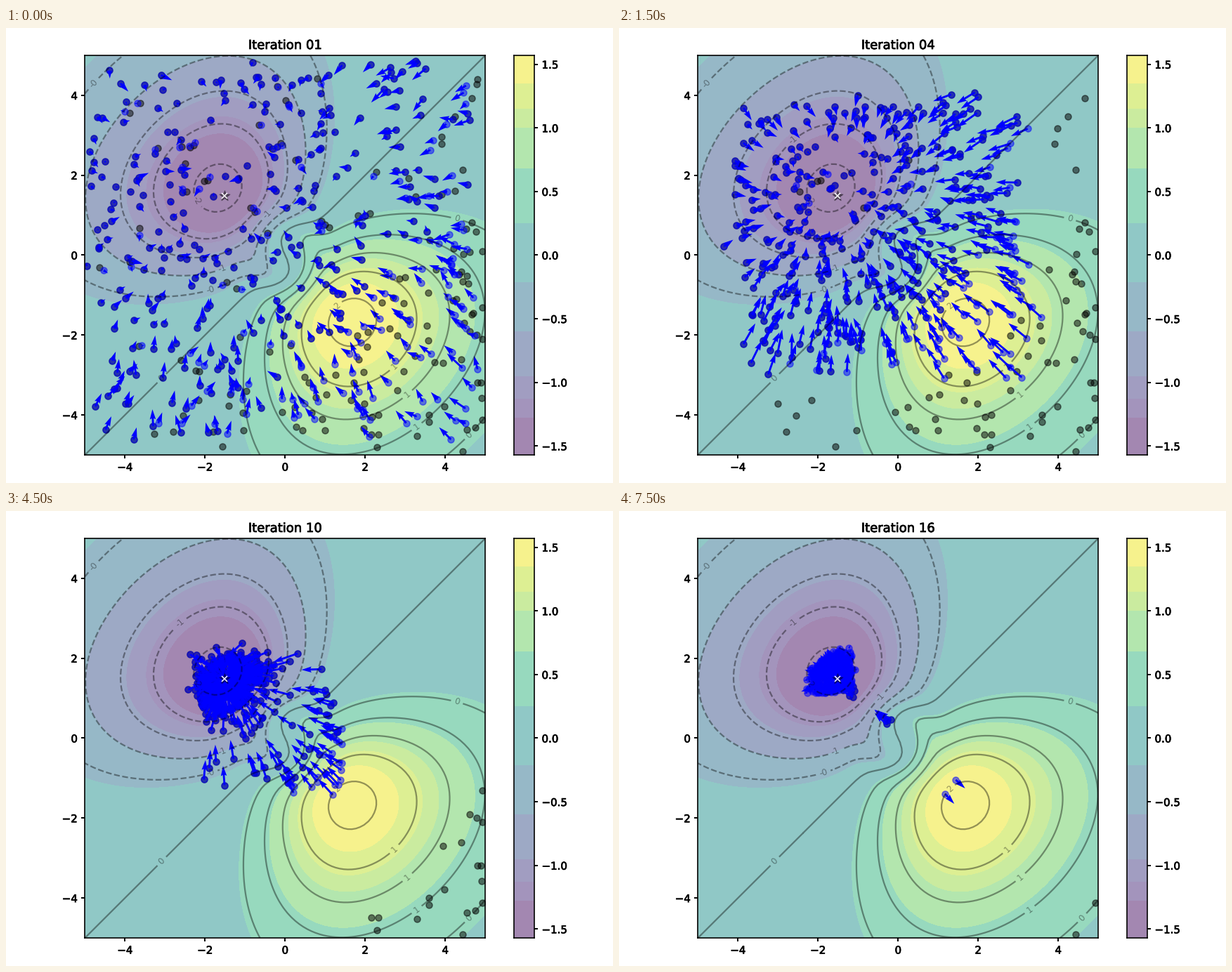
A matplotlib script for the animation above (8 s loop, 864 by 648 pixels).

```python
import numpy as np
import matplotlib.pyplot as plt
from matplotlib import patheffects
from matplotlib.animation import FuncAnimation

W, H, DPI = 864, 648, 108
STEPS = 16
COUNT = 400
GOAL = np.array([-1.51, 1.49])
INERTIA = 0.8


def height(x, y):
    """A hill and a valley facing each other, twisted around the centre."""
    r = np.hypot(x, y) + 1e-9
    twist = np.radians(68) * np.exp(-(r / .79) ** 2.85)
    a = np.arctan2(y, x) + np.pi / 4 - twist
    u, v = r * np.cos(a), r * np.sin(a)
    fall = (np.abs(u) - 2.1) ** 2 / 11.2 + v**2 / 22 + .015 * v**4 / (u**2 + .4)
    return 1.6 * np.exp(-fall) * np.cos(a) * (1 - np.exp(-r**1.8))


def social_pull(k):
    """Pull towards the swarm's best: a kick, then a slow rise."""
    return .05 if k < 2 else min(.019 + .032 * (k / 8) ** 2, .06)


def own_pull(k):
    """Pull towards a particle's own best: comes and goes in waves."""
    return .022 + .075 * max(0, np.cos(2 * np.pi * (k - 4.5) / 8.5))


def simulate():
    rng = np.random.RandomState(100)
    pos = (rng.rand(2, COUNT) * 10 - 5).T
    vel = rng.randn(2, COUNT).T * .1
    best = pos.copy()
    states = []
    for k in range(STEPS):
        vel = (INERTIA * vel + social_pull(k) * (GOAL - pos)
               + own_pull(k) * (best - pos))
        pos = pos + vel
        better = height(*pos.T) < height(*best.T)
        best = np.where(better[:, None], pos, best)
        states.append((best, pos, vel))
    return states


def place(left, top, right, bottom):
    return fig.add_axes([left / W, 1 - bottom / H, (right - left) / W, (bottom - top) / H])


def embolden(texts):
    for t in texts:
        t.set_path_effects([patheffects.withStroke(linewidth=.5, foreground="black")])


def style(axes):
    for side in axes.spines.values():
        side.set_linewidth(1.1)
    axes.tick_params(width=1.3)
    embolden(axes.get_xticklabels() + axes.get_yticklabels())


plt.rcParams["font.family"] = "DejaVu Sans"
fig = plt.figure(figsize=(W / DPI, H / DPI), dpi=DPI, facecolor="white")
ax = place(112.4, 39, 682.2, 608)
cax = place(723, 39, 752, 608)

# tinted bands of the landscape
edges = np.array([-1.6, -1.28, -1.13, -.95, -.6, -.21, .25, .68, 1, 1.15, 1.35, 1.6])
mids = (edges[:-1] + edges[1:]) / 2
tints = .5 + .5 * plt.get_cmap("viridis")((mids + 1.57) / 3.14)[:, :3]

grid = np.linspace(-5, 5, 100)
gx, gy = np.meshgrid(grid, grid)
gz = height(gx, gy)
ax.set(xlim=(-5, 5), ylim=(-5, 5))
ax.contourf(gx, gy, gz, edges, colors=tints, zorder=0)
lines = ax.contour(gx, gy, gz, np.arange(-5, 6) * .3, colors="black", alpha=.4)
ax.clabel(lines, inline=True, fontsize=8, fmt="%.0f")
ax.set_xticks(range(-4, 5, 2))
ax.set_yticks(range(-4, 5, 2))
style(ax)

for low, high, tint in zip(edges[:-1], edges[1:], tints):
    cax.axhspan(low, high, color=tint, lw=0)
cax.set(xlim=(0, 1), ylim=(-1.57, 1.57), xticks=[])
cax.yaxis.tick_right()
cax.set_yticks(np.arange(-3, 4) * .5)
style(cax)

states = simulate()
best, pos, vel = states[0]
best_dots = ax.scatter(*best.T, color="black", alpha=.5)
dots = ax.scatter(*pos.T, color="blue", alpha=.5)
arrows = ax.quiver(*pos.T, *vel.T, color="blue", width=.005,
                   angles="xy", scale_units="xy", scale=1, zorder=1)
ax.scatter(*GOAL, marker="*", s=100, color="black", alpha=.4)
ax.plot(-1.52, 1.48, "x", color="white", markersize=5, zorder=5)
title = ax.set_title("Iteration 01", fontsize=12)
embolden([title])


def update(k):
    best, pos, vel = states[k]
    best_dots.set_offsets(best)
    dots.set_offsets(pos)
    arrows.set_offsets(pos)
    arrows.XY = pos  # the angles are worked out from these points
    arrows.set_UVC(*vel.T)
    title.set_text(f"Iteration {k + 1:02d}")
    return best_dots, dots, arrows, title


anim = FuncAnimation(fig, update, frames=STEPS, interval=500,
                     repeat=True, repeat_delay=0, blit=False)
plt.show()
```
